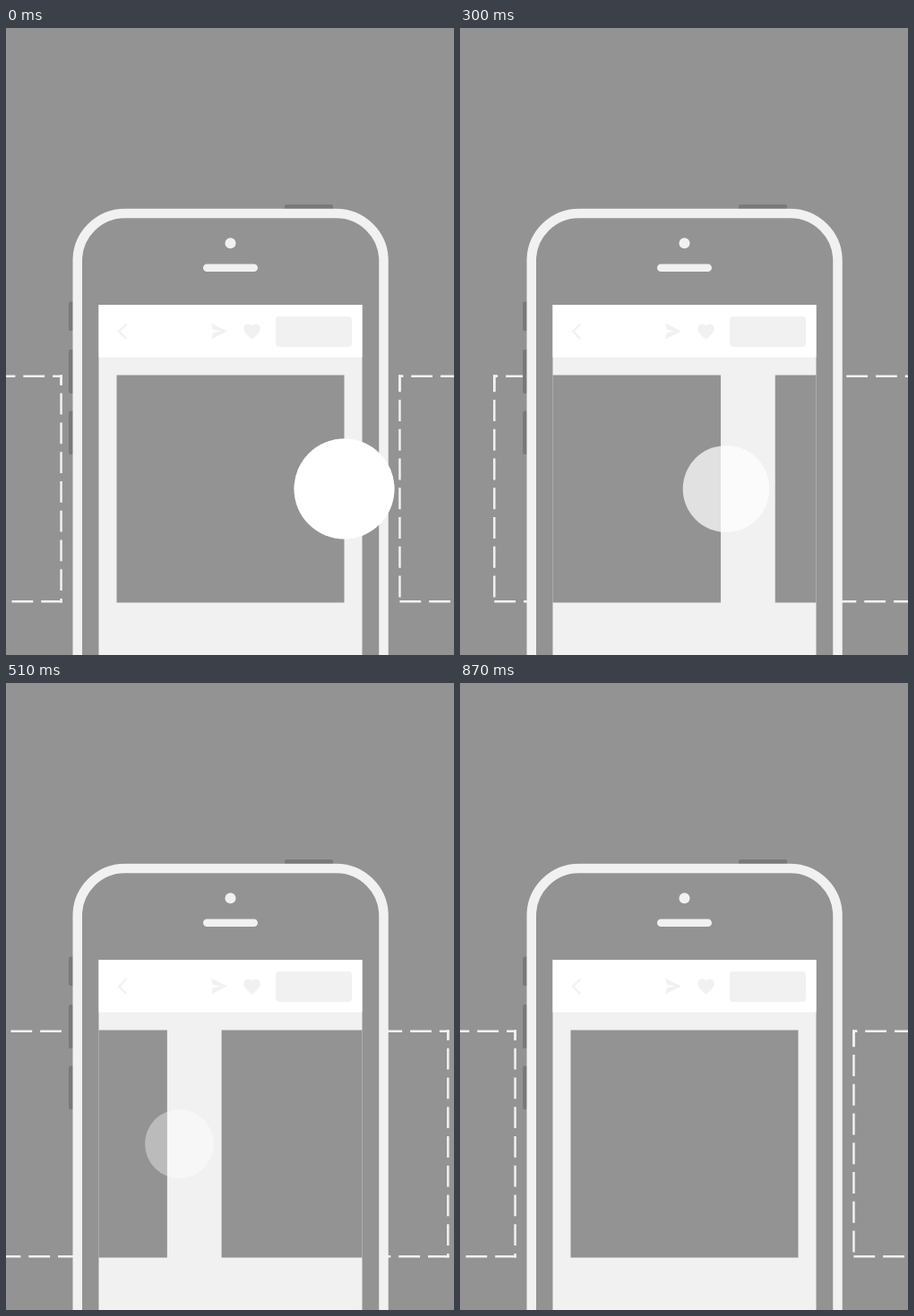
Write an HTML page that moves like this. It is 500x700 px and loops after 1.35 s.

```html
<!DOCTYPE html>
<html lang="en">
<head>
<meta charset="utf-8">
<title>Swipe gallery</title>
<style>
  html, body { margin: 0; height: 100%; overflow: hidden; background: #939393; }
  svg { display: block; width: 100vw; height: 100vh; }
  .dash { stroke: #f1f1f1; stroke-width: 2.5; stroke-dasharray: 23.8 8.95; }
</style>
</head>
<body>
<svg viewBox="0 0 500 700">
  <defs>
    <clipPath id="screen"><rect x="103.5" y="309" width="294" height="391"/></clipPath>
    <!-- each side of the outline has its own dash phase -->
    <g id="outline" class="dash">
      <path d="M0 1.25H254" stroke-dashoffset="-14"/>
      <path d="M252.75 0V254" stroke-dashoffset="-20.2"/>
      <path d="M0 252.75H254" stroke-dashoffset="-1.2"/>
      <path d="M1.25 0V254" stroke-dashoffset="-27.6"/>
      <path d="M0 1.25H5M252.75 0V11.3M1.25 0V18.6" stroke-dasharray="none"/>
    </g>
    <rect id="tile" width="254" height="254" fill="#939393"/>
  </defs>

  <g class="strip" data-use="outline"></g>

  <g fill="#797979">
    <rect x="311" y="197" width="54" height="10" rx="2"/>
    <rect x="70" y="305.5" width="10" height="32.5" rx="2"/>
    <rect x="70" y="359" width="10" height="49" rx="2"/>
    <rect x="70" y="427.5" width="10" height="48.5" rx="2"/>
  </g>
  <rect x="79.75" y="207" width="341.75" height="600" rx="53" fill="#939393" stroke="#f1f1f1" stroke-width="10.5"/>
  <g fill="#f1f1f1">
    <circle cx="250.5" cy="240.3" r="6"/>
    <rect x="220" y="263.5" width="61" height="8.5" rx="4.25"/>
    <rect x="103.5" y="309" width="294" height="391"/>
    <rect x="103.5" y="309" width="294" height="58.5" fill="#fff"/>
    <path d="M134.5 330.5L126 338.7L134.5 347" fill="none" stroke="#f1f1f1" stroke-width="2"/>
    <path d="M229 329.5L247 338.5L229 347.5L231 340.2L240 338.5L231 336.8Z"/>
    <path transform="translate(263.4 327.8) scale(.93)" d="M12 21.35l-1.45-1.32C5.4 15.36 2 12.28 2 8.5 2 5.42 4.42 3 7.5 3c1.74 0 3.41.81 4.5 2.09C13.09 3.81 14.76 3 16.5 3 19.58 3 22 5.42 22 8.5c0 3.78-3.4 6.86-8.55 11.54z"/>
    <rect x="301" y="322" width="85" height="34" rx="4"/>
  </g>
  <g clip-path="url(#screen)"><g class="strip" data-use="tile"></g></g>

  <circle id="ripple" cx="377.5" cy="514.5" fill="#fff"/>
  <circle id="touch" cy="514.5" fill="#fff"/>
</svg>
<script>
  const LOOP = 1350, STEP = 30, SWIPE = 870, RIPPLE = 180;
  const PITCH = 314.7, RADIUS = 56;
  const strips = document.querySelectorAll('.strip');
  const ripple = document.getElementById('ripple');
  const touch = document.getElementById('touch');

  for (const strip of strips)
    strip.innerHTML = [-1, 0, 1, 2].map(i =>
      `<use href="#${strip.dataset.use}" x="${123.5 + i * PITCH}" y="387.5"/>`).join('');

  const set = (el, attrs) => {
    for (const name in attrs) el.setAttribute(name, attrs[name]);
  };

  function draw() {
    const t = Math.floor(performance.now() % LOOP / STEP) * STEP;
    const u = Math.min(t / SWIPE, 1);
    const p = u * u * (3 - 2 * u);
    const q = Math.min(t / RIPPLE, 1);

    for (const strip of strips) set(strip, { transform: `translate(${-PITCH * p} 0)` });
    set(touch, { cx: 377.5 - 293 * p, r: RADIUS * (1 - p / 2), opacity: 1 - p });
    set(ripple, { r: RADIUS * (1 + q), opacity: 0.4 * (1 - q) });
    requestAnimationFrame(draw);
  }
  draw();
</script>
</body>
</html>
```
